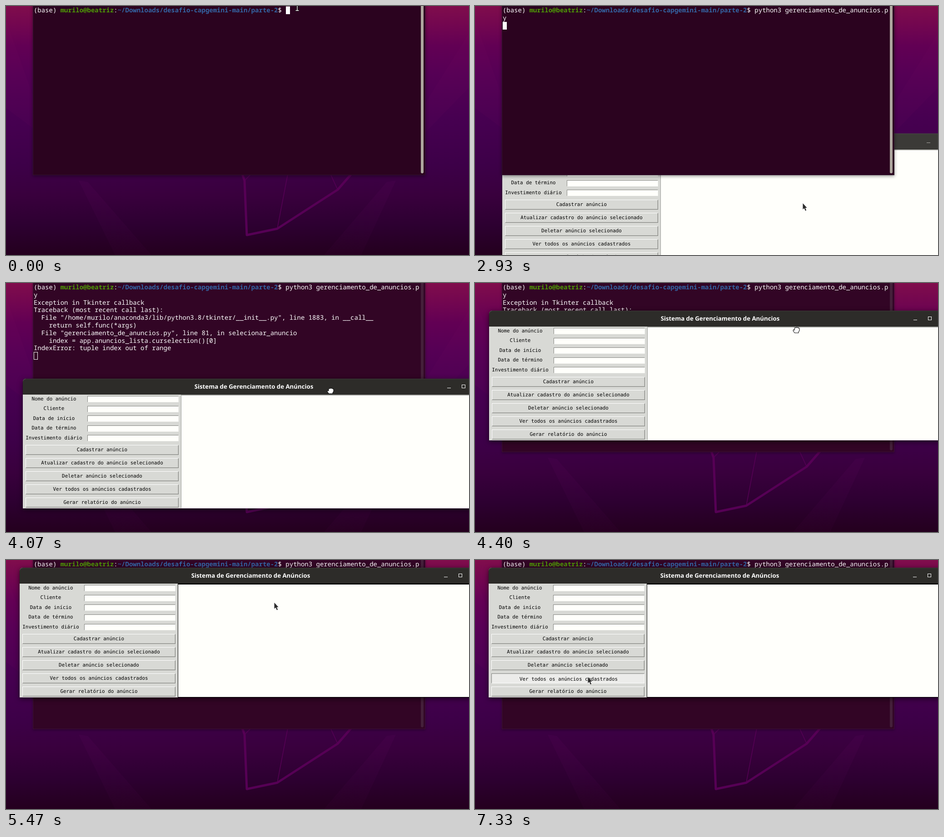
Animation, 1019 px wide and 549 px high, one loop 8 s. Source, as an HTML page:

```html
<!DOCTYPE html>
<html lang="pt-BR">
<head>
<meta charset="utf-8">
<title>Sistema de Gerenciamento de Anúncios</title>
<style>
html, body { margin: 0; width: 100%; height: 100%; overflow: hidden; background: #24001e; }
#stage { position: absolute; left: 0; top: 0; width: 1019px; height: 549px; overflow: hidden; text-rendering: geometricPrecision; }
#stage *, #stage ::after { box-sizing: border-box; }
#stage div, #stage pre, #stage svg { position: absolute; margin: 0; }

/* every animation shares one 8 s clock and jumps between poses */
.a { animation: 8s step-end infinite; }

/* terminal */
#term { left: 59px; top: -40px; width: 864px; height: 413px; z-index: 2; background: #2b031f;
  border: 1px solid #33142f; box-shadow: 0 2px 7px rgba(0,0,0,.45); animation-name: blur; }
#term pre { left: .9px; top: 41px; font: 14px/16.8px "Noto Sans Mono", "DejaVu Sans Mono", monospace; color: #fff; }
#term b { color: #4e9a06; }
#term b + b { color: #3465a4; }
#cmd { animation-name: cmd; }
#log { animation-name: log; }
#caret { left: .5px; top: 39px; width: 9px; height: 17px; background: #fff; border: 1px solid #fff; animation-name: caret; }
#bar { left: 853px; top: 0; width: 6px; height: 408px; border-radius: 0 0 3px 3px; background: #aea79f; animation-name: bar; }

/* form window */
#win { left: 0; top: 0; width: 1017px; height: 286px; z-index: 1; background: #d8d9d5; border-radius: 7px 7px 0 0;
  transform-origin: 50% 50%; animation-name: open, raise, drag; }
#head { left: 0; top: 0; width: 100%; height: 35px; border-radius: 7px 7px 0 0; background: #3b3a37;
  border-top: 1px solid #4a4946; border-bottom: 1px solid #242320; color: #a9a8a4; text-align: center;
  font: bold 13.26px/33px "Noto Sans", "Open Sans", sans-serif; animation-name: head; }
#min { left: 934px; top: 19px; width: 8px; height: 1px; background: currentColor; }
#max { left: 966px; top: 12px; width: 8px; height: 8px; border: 1px solid currentColor; }
#list { left: 348px; top: 35px; width: 669px; height: 251px; background: #fffffb; border: 1px solid #9c9d99; border-top-width: 2px;
  border-bottom-color: #e8e9e5; animation-name: list; }
.row, .btn { font: 10.88px/14px "DejaVu Sans Mono", monospace; color: #000; text-align: center; white-space: pre; }
.row { left: 0; width: 137px; height: 14px; top: calc(37.5px + 21.5px * var(--i)); }
.row::after { content: ""; position: absolute; left: 142px; top: .5px; width: 201px; height: 14px; background: #fffffb;
  border: 1px solid; border-color: #858682 #f4f5f1 #f4f5f1 #858682; }
.btn { left: 6px; width: 337px; height: 22px; top: calc(146px + 28.9px * var(--i)); line-height: 20px;
  background: #d8d9d5; border: 1px solid; border-color: #fff #80817d #80817d #fff; box-shadow: inset -1px -1px #c4c5c1; }
#upd { animation-name: upd; }
#del { animation-name: del; }
#all { animation-name: all; }
#all span { position: relative; animation-name: push; }

/* pointer */
#mouse { left: 0; top: 0; z-index: 9; animation-name: mouse; }
#mouse svg { overflow: visible; width: 1px; height: 1px; left: 0; top: 0; }
#beam { animation-name: beam; }
#arrow { animation-name: arrow; }
#hand { animation-name: hand; }

@keyframes blur { 39.25% { background: #320525; border-color: #3d1236; box-shadow: 0 2px 5px rgba(0,0,0,.35); } 100% { background: #320525; } }
@keyframes bar { 39.25%, 100% { background: #45203a; } }
@keyframes cmd { 0% { visibility: hidden; } 11.625%, 100% { visibility: visible; } }
@keyframes log { 0% { visibility: hidden; } 39.25%, 100% { visibility: visible; } }
@keyframes caret {
  0% { translate: 555px 1px; opacity: 1; }
  6.625% { translate: 555px 1px; opacity: 0; }
  11.625% { translate: 17px 18px; opacity: 1; }
  19.125% { translate: 0 35px; opacity: 1; }
  26.625% { translate: 0 35px; opacity: 0; }
  34.125% { translate: 0 35px; opacity: 1; background: #fff; }
  39.25%, 100% { translate: 0 152px; opacity: 1; background: transparent; }
}
@keyframes open {
  0% { opacity: 0; scale: .3; }
  25% { opacity: .6; scale: .6; }
  25.875% { opacity: .95; scale: .95; }
  26.625%, 100% { opacity: 1; scale: 1; }
}
@keyframes raise {
  0% { z-index: 1; box-shadow: 0 1px 3px rgba(0,0,0,.4); }
  38.375%, 100% { z-index: 3; box-shadow: 0 3px 12px rgba(0,0,0,.6), 0 0 1px #000; }
}
@keyframes head { 38.375%, 100% { background: #2d2c29; color: #fff; border-top-color: #3d3c38; } }
@keyframes list { 59.125%, 100% { border: 1px solid #000; border-top-width: 2px; } }
@keyframes drag {
  0% { translate: 60px 281px; }
  48.375% { translate: 58px 276px; }
  49.125% { translate: 53px 260px; }
  50% { translate: 45px 236px; }
  50.875% { translate: 37px 211px; }
  51.625% { translate: 36px 185px; }
  52.5% { translate: 34px 152px; }
  53.375% { translate: 33px 115px; }
  54.125% { translate: 32px 82px; }
  55% { translate: 31px 61px; }
  55.875% { translate: 31px 48px; }
  56.625% { translate: 30px 36px; }
  57.5% { translate: 30px 25px; }
  58.375%, 100% { translate: 30px 17px; }
}
@keyframes mouse {
  0% { translate: 641px 5px; }
  31.625% { translate: 684px 114px; }
  33.375% { translate: 706px 270px; }
  34.125% { translate: 716px 398px; }
  35.875% { translate: 722px 425px; }
  36.625% { translate: 721px 435px; }
  40% { translate: 721px 430px; }
  40.875% { translate: 722px 415px; }
  41.625% { translate: 724px 394px; }
  42.5% { translate: 726px 371px; }
  43.375% { translate: 728px 350px; }
  44.125% { translate: 730px 333px; }
  45% { translate: 731px 322px; }
  45.875% { translate: 731px 316px; }
  46.625% { translate: 731px 314px; }
  48.375% { translate: 725px 293px; }
  49.125% { translate: 717px 269px; }
  50% { translate: 712px 249px; }
  50.875% { translate: 709px 228px; }
  51.625% { translate: 706px 185px; }
  52.5% { translate: 705px 148px; }
  53.375% { translate: 704px 115px; }
  54.125% { translate: 703px 100px; }
  55% { translate: 702px 94px; }
  55.875% { translate: 702px 81px; }
  56.625% { translate: 702px 69px; }
  57.5% { translate: 702px 58px; }
  58.375% { translate: 702px 50px; }
  64.125% { translate: 697px 43px; }
  65% { translate: 687px 49px; }
  67.5% { translate: 645px 70px; }
  68.375% { translate: 590px 94px; }
  70% { translate: 540px 116px; }
  70.875% { translate: 470px 147px; }
  71.625% { translate: 402px 174px; }
  72.5% { translate: 345px 196px; }
  73.375% { translate: 312px 207px; }
  74.125% { translate: 275px 223px; }
  77.5% { translate: 255px 232px; }
  78.375% { translate: 252px 245px; }
  79.125% { translate: 250px 253px; }
  80%, 100% { translate: 248px 258px; }
}
@keyframes beam { 0% { visibility: visible; } 34.125%, 100% { visibility: hidden; } }
@keyframes arrow {
  0% { visibility: hidden; }
  34.125% { visibility: visible; }
  48.375% { visibility: hidden; }
  59.125%, 100% { visibility: visible; }
}
@keyframes hand { 0% { visibility: hidden; } 48.375% { visibility: visible; } 59.125%, 100% { visibility: hidden; } }
@keyframes upd { 72.5% { background: #ececea; } 74.125%, 100% { background: #d8d9d5; } }
@keyframes del { 74.125% { background: #ececea; } 78.375%, 100% { background: #d8d9d5; } }
@keyframes all {
  79.125% { background: #ececea; }
  91.625%, 100% { background: #ececea; border-color: #80817d #fff #fff #80817d; box-shadow: none; }
}
@keyframes push { 0% { left: 0; top: 0; } 91.625%, 100% { left: 1.5px; top: 2px; } }
</style>
</head>
<body>
<div id="stage">
  <svg width="1019" height="549" viewBox="0 0 1019 549">
    <defs>
      <linearGradient id="sky" x1="0" y1="0" x2="0" y2="1">
        <stop offset="0" stop-color="#800d4c"/>
        <stop offset=".08" stop-color="#720650"/>
        <stop offset=".16" stop-color="#620054"/>
        <stop offset=".27" stop-color="#560055"/>
        <stop offset=".45" stop-color="#470051"/>
        <stop offset=".64" stop-color="#3d0048"/>
        <stop offset=".76" stop-color="#39003d"/>
        <stop offset=".88" stop-color="#2d0031"/>
        <stop offset="1" stop-color="#24001e"/>
      </linearGradient>
      <linearGradient id="ray" x1="0" y1="0" x2="0" y2="1">
        <stop offset="0" stop-color="#6a0868" stop-opacity=".12"/>
        <stop offset="1" stop-color="#6a0868" stop-opacity=".05"/>
      </linearGradient>
    </defs>
    <path fill="url(#sky)" d="M0 0H1019V549H0z"/>
    <path fill="url(#ray)" d="M160 385L180 388 320 549H240zM858 385L838 388 700 549H782z"/>
    <path fill="#80106c" opacity=".06" d="M0 30L60 200V270L0 225zM1019 60L922 215V280L1019 180z"/>
    <g fill="none" stroke="#560055" stroke-linejoin="round">
      <path stroke-width="5" d="M518 365L525 385 530 505 597 491 730 405 764 366"/>
      <path stroke-width="1.5" d="M621 366L597 491M712 366L730 405M527 383L542 368"/>
    </g>
  </svg>

  <div id="term" class="a">
    <pre>(base) <b>murilo@beatriz</b>:<b>~/Downloads/desafio-capgemini-main/parte-2</b>$ <span id="cmd" class="a">python3 gerenciamento_de_anuncios.p
y</span>
<span id="log" class="a">Exception in Tkinter callback
Traceback (most recent call last):
  File "/home/murilo/anaconda3/lib/python3.8/tkinter/__init__.py", line 1883, in __call__
    return self.func(*args)
  File "gerenciamento_de_anuncios.py", line 81, in selecionar_anuncio
    index = app.anuncios_lista.curselection()[0]
IndexError: tuple index out of range</span></pre>
    <div id="caret" class="a"></div>
    <div id="bar" class="a"></div>
  </div>

  <div id="win" class="a">
    <div id="head" class="a">Sistema de Gerenciamento de Anúncios<div id="min"></div><div id="max"></div></div>
    <div class="row" style="--i:0">Nome do anúncio</div>
    <div class="row" style="--i:1">Cliente</div>
    <div class="row" style="--i:2">Data de início</div>
    <div class="row" style="--i:3">Data de término</div>
    <div class="row" style="--i:4">Investimento diário</div>
    <div class="btn" style="--i:0">Cadastrar anúncio</div>
    <div class="btn a" id="upd" style="--i:1">Atualizar cadastro do anúncio selecionado</div>
    <div class="btn a" id="del" style="--i:2">Deletar anúncio selecionado</div>
    <div class="btn a" id="all" style="--i:3"><span class="a">Ver todos os anúncios cadastrados</span></div>
    <div class="btn" style="--i:4">Gerar relatório do anúncio</div>
    <div id="list" class="a"></div>
  </div>

  <div id="mouse" class="a">
    <svg id="beam" class="a">
      <g fill="none">
        <path stroke="#000" stroke-width="3" d="M-4 -6H4M0 -6V5M-4 5H4"/>
        <path stroke="#fff" stroke-width="1.4" d="M-3.5 -6H3.5M0 -6V5M-3.5 5H3.5"/>
      </g>
    </svg>
    <svg id="arrow" class="a">
      <path fill="#2b2b2b" stroke="#fff" stroke-width="1" paint-order="stroke" d="M.5 0V13.5L3.6 10.8 6 16.5 8.2 15.5 5.8 10H9.6z"/>
    </svg>
    <svg id="hand" class="a">
      <path fill="#fff" stroke="#111" stroke-width="1.1" stroke-linejoin="round" d="M1.5 16L-1.5 12Q-2.5 9 0 9L1 10V6Q2 3.5 4 5Q5.5 2.5 7 4.5Q9 3 10 5.5Q12 5 12 7.5V11L10 14V16z"/>
    </svg>
  </div>
</div>
</body>
</html>
```
